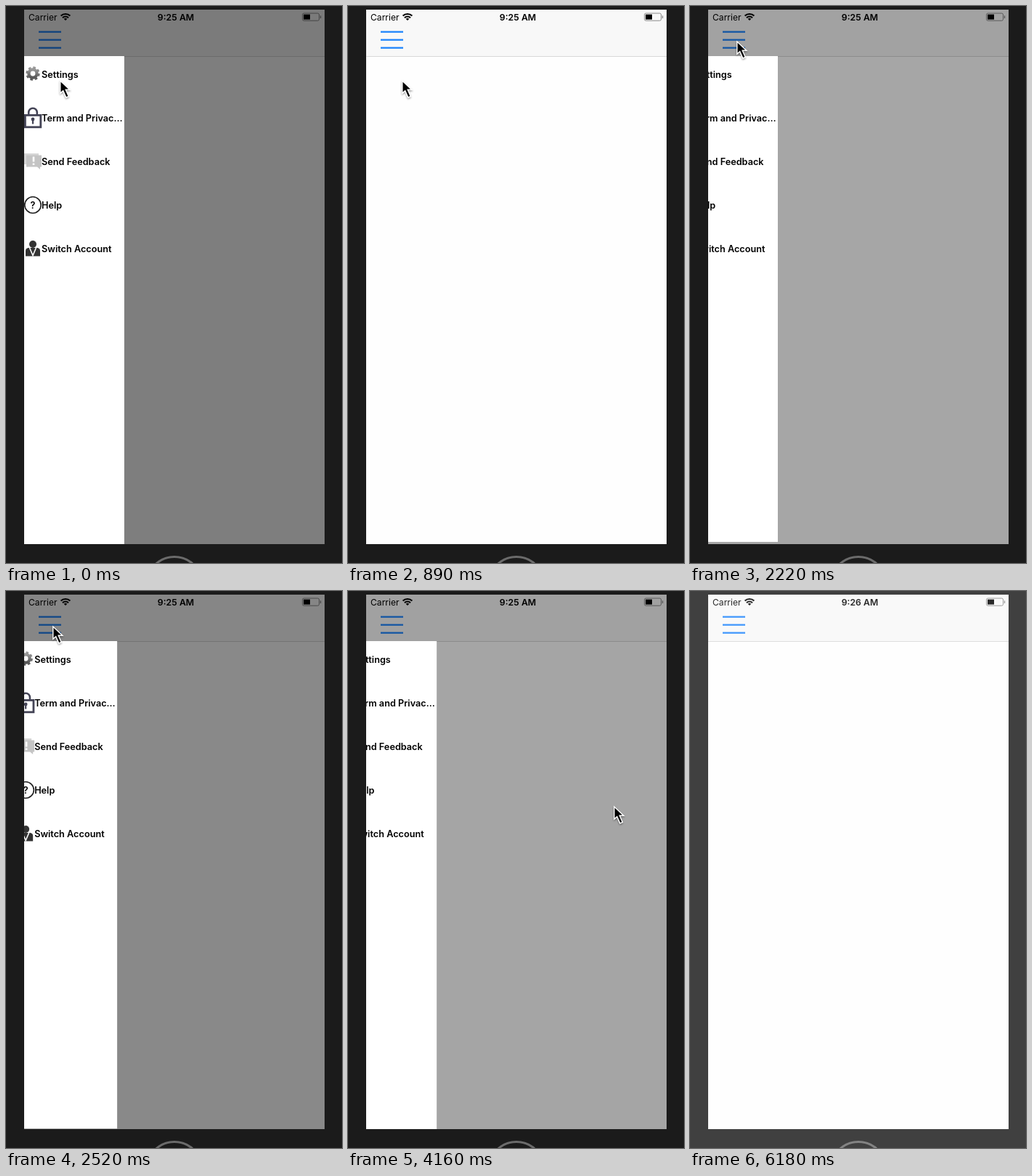
Recreate the animation shown at these times as an HTML page. Size 463 by 767 pixels, loop 6280 ms.

```html
<!DOCTYPE html>
<html lang="en">
<head>
<meta charset="utf-8">
<title>Slide-in menu</title>
<style>
  html, body { margin: 0; width: 100%; height: 100%; overflow: hidden; background: #1b1b1b; }
  svg { display: block; }
  text { font-family: Inter, "Liberation Sans", sans-serif; font-size: 12.7px; }
  .bold { font-weight: 600; }
</style>
</head>
<body>
<svg width="463" height="767" viewBox="0 0 463 767">
  <defs>
    <clipPath id="screen"><rect x="25" y="5" width="414" height="736"/></clipPath>
    <linearGradient id="steel" x1="0" y1="0" x2="0" y2="1">
      <stop offset="0" stop-color="#999"/><stop offset="1" stop-color="#555"/>
    </linearGradient>
    <filter id="shadow" x="-50%" y="-50%" width="200%" height="200%">
      <feDropShadow dx="0" dy="1.5" stdDeviation="1.3" flood-opacity=".4"/>
    </filter>
  </defs>

  <rect width="463" height="767" fill="#1b1b1b"/>
  <circle cx="232" cy="796.5" r="38" fill="none" stroke="#6b6b6b" stroke-width="3"/>

  <g clip-path="url(#screen)">
    <rect x="25" y="5" width="414" height="736" fill="#fefefe"/>
    <rect x="25" y="5" width="414" height="64" fill="#f8f8f8"/>
    <path d="M25 69.5H439" stroke="#d8d8d8"/>
    <path d="M45 35.7H76M45 46.7H76M45 57.7H76" stroke="#1a82fb" stroke-width="2.2"/>

    <text x="31" y="20" style="font-size:12.1px">Carrier</text>
    <text id="clock" class="bold" x="234" y="20" text-anchor="middle" style="font-size:12.3px"></text>
    <g fill="none" stroke="#000" stroke-width="2.1">
      <path d="M75.6 13.6A9 9 0 0 1 88.4 13.6M78 16.2A5.6 5.6 0 0 1 86 16.2"/>
      <path d="M82 20L79.8 17.8A3.2 3.2 0 0 1 84.2 17.8Z" fill="#000" stroke="none"/>
    </g>
    <rect x="408.5" y="10" width="23" height="10.2" rx="2" fill="none" stroke="#8a8a8a"/>
    <rect x="410" y="11.6" width="9" height="7" fill="#000"/>
    <path d="M433.5 13.3V17" stroke="#8a8a8a" stroke-width="1.4"/>

    <rect id="dim" x="25" y="5" width="414" height="736"/>

    <g id="menu">
      <rect id="sheet" x="25" y="69" width="138" fill="#fff"/>
      <g class="bold" id="labels"></g>

      <g fill="none" stroke="url(#steel)">
        <circle cx="37" cy="93" r="5.6" stroke-width="4.4"/>
        <circle cx="37" cy="93" r="8.4" stroke-width="2.6" stroke-dasharray="3.6 2.997"/>
      </g>

      <g fill="none" stroke="#444456">
        <path d="M31.2 150V146.5A5.8 5.8 0 0 1 42.8 146.5V150" stroke-width="2.6"/>
        <rect x="26.4" y="150.4" width="21.4" height="16.4" stroke-width="2.8"/>
        <path d="M37 156V162.5" stroke-width="2.2"/>
        <circle cx="37" cy="156" r="2.4" fill="#444456" stroke="none"/>
      </g>

      <path d="M25 203H45V218H33L29 222V218H25Z" fill="#d6d6d6"/>
      <path d="M28 205.5H49V221.5H47V225L43 221.5H28Z" fill="#c4c4c4"/>
      <path d="M38 207.5V214.5M38 216.5V219" stroke="#fff" stroke-width="2.6"/>

      <circle cx="37" cy="274" r="11.2" fill="none" stroke="#222" stroke-width="1.6"/>
      <text x="37" y="278.6" text-anchor="middle" class="bold">?</text>

      <circle cx="37" cy="328" r="5" fill="#333"/>
      <path d="M27 344.5V337Q27 333.5 31 333H43Q47 333.5 47 337V344.5Z" fill="#333"/>
      <path d="M32.5 333L37 343.5L41.5 333" fill="none" stroke="#fff" stroke-width="1.6"/>
    </g>
  </g>

  <g id="cursor" filter="url(#shadow)">
    <path d="M.8 1V18L4.7 14.6L8.8 23.8L12.2 22.3L8.2 13.2H13.8Z" stroke="#fff" stroke-width="1.4"/>
  </g>
  <rect id="fade" width="463" height="767" fill="#fff"/>
</svg>

<script>
const LOOP = 6280, WIDTH = 138;
const $ = id => document.getElementById(id);
const set = (id, name, value) => $(id).setAttribute(name, value);

$('labels').innerHTML = ['Settings', 'Term and Privac…', 'Send Feedback', 'Help', 'Switch Account']
  .map((label, i) => `<text x="49" y="${98.6 + 60 * i}">${label}</text>`).join('');

// Bursts of motion: start, end, number of intervals; the picture rests in between
const bursts = [[0, 0, 0], [590, 890, 2], [1330, 1630, 2], [1920, 3870, 13],
                [4160, 5200, 7], [5350, 5350, 0], [6180, 6180, 0]];

function snap(t) {
  const [start, end, n] = bursts.findLast(b => b[0] <= t);
  if (t >= end) return end;
  const step = (end - start) / n;
  return start + Math.floor((t - start) / step) * step;
}

// Distance left to go in a critically damped spring
const spring = x => x > 0 ? (1 + x) * Math.exp(-x) : 1;

function openness(t) {
  if (t < 1836) return spring(.0184 * (t - 440));
  if (t < 4020) return 1 - spring(.0063 * (t - 1836));
  return spring(.0184 * (t - 4101));
}

// Pointer moves: start, end, x, y reached
const moves = [[1180, 1630, 64, 48], [3270, 3870, 366, 296], [4460, 5200, 380, 800]];

function pointer(t) {
  let x = 74, y = 102;
  for (const [start, end, toX, toY] of moves) {
    const u = Math.min(1, Math.max(0, (t - start) / (end - start)));
    const k = u * u * (3 - 2 * u);
    x += (toX - x) * k;
    y += (toY - y) * k;
  }
  return [x, y];
}

function draw() {
  const t = snap(performance.now() % LOOP);
  const open = openness(t);
  const gap = t >= 1836 && t < 4020 ? 10 * (1 - open) : 0;
  set('menu', 'transform', `translate(${WIDTH * (open - 1)} 0)`);
  set('sheet', 'height', 672 - gap);
  set('dim', 'opacity', open / 2);
  set('cursor', 'transform', `translate(${pointer(t)})`);
  set('fade', 'opacity', t >= 6180 ? .16 : 0);
  $('clock').textContent = t >= 5350 ? '9:26 AM' : '9:25 AM';
  requestAnimationFrame(draw);
}
draw();
</script>
</body>
</html>
```
